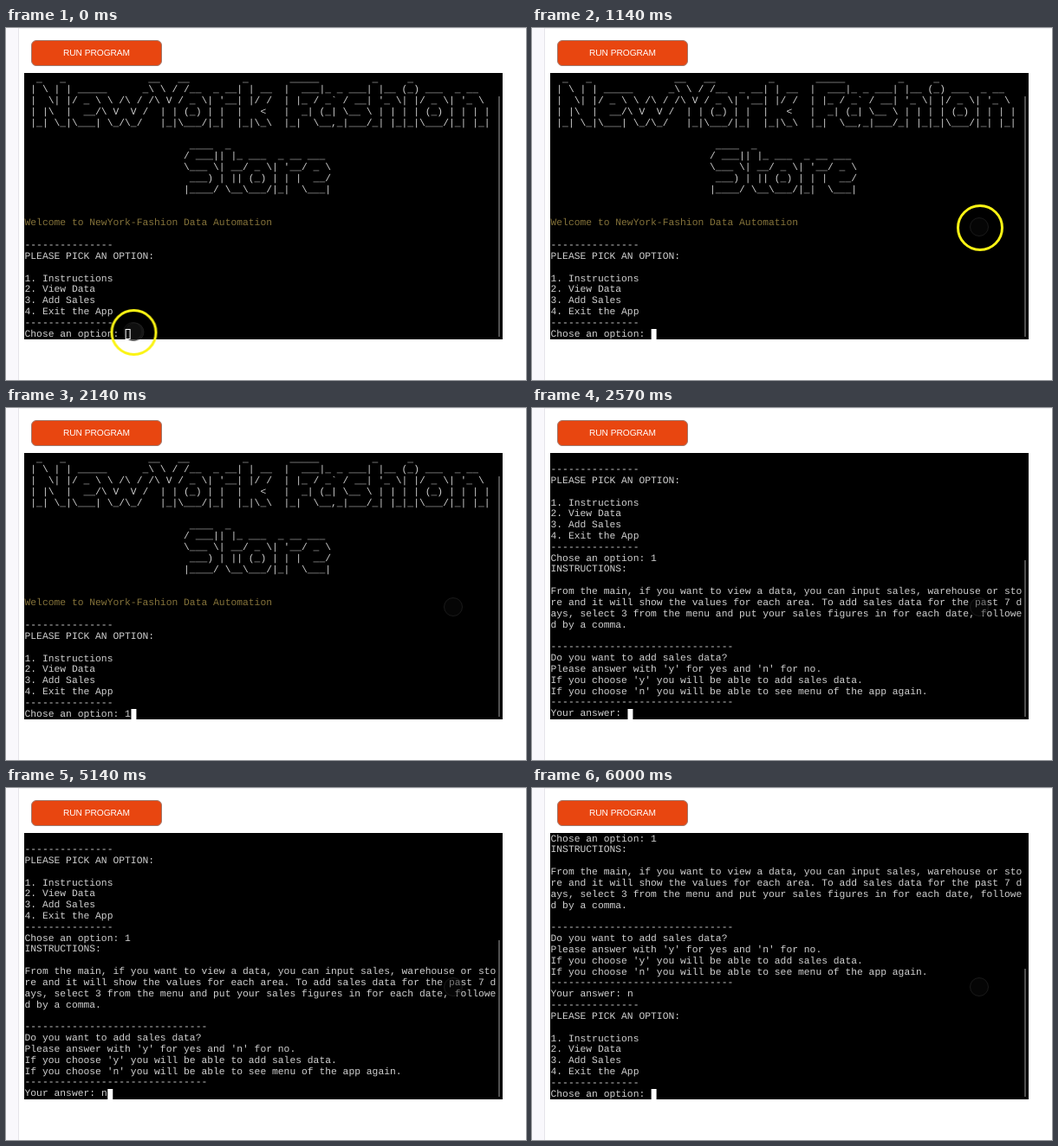
An HTML page for the animation above (8 s loop, 600 by 407 pixels).

```html
<!DOCTYPE html>
<html lang="en">
<head>
<meta charset="utf-8">
<title>Terminal session</title>
<style>
:root { --cw: 6.8px; --lh: 12.833px; }
html, body { margin: 0; width: 100%; height: 100%; overflow: hidden; background: #fff; }
.stage { position: relative; width: 600px; height: 407px; overflow: hidden; }
.stage > * { position: absolute; box-sizing: border-box; }
.side { left: 0; top: 0; width: 15px; height: 407px; background: #f9f8fc; border-right: 1px solid #e5e4e9; }
.edge { left: 15px; top: 0; width: 585px; height: 1px; background: #f0eff3; }
.run {
  left: 29px; top: 14px; width: 151px; height: 30px;
  border: 1px solid #a0776a; border-radius: 6px; background: #e84610; color: #fff;
  font: 10.15px/29px "Liberation Sans", Arial, sans-serif; text-align: center;
  text-rendering: geometricPrecision;
}
.term { left: 21px; top: 52px; width: 552px; height: 308px; background: #000; overflow: hidden; }
pre {
  position: absolute; left: .5px; top: 1.6px; margin: 0; color: #d0d0d0;
  font: 11.333px/var(--lh) "Liberation Mono", "Courier New", monospace;
  font-variant-ligatures: none; text-rendering: geometricPrecision;
}
.gold { color: #85733a; }
.thumb { position: absolute; left: 547px; top: 27px; bottom: 3px; width: 2px; background: #505050; }
.cursor { left: 21.6px; top: 348px; width: 6.8px; height: 12px; border: 1px solid #fff; }
svg { left: 0; top: 0; }

pre, .thumb, .cursor, .one, .no, .menu, .echo, .pointer, .ring { animation: 8s step-end infinite; }
pre { animation-name: scroll; }
.thumb { animation-name: thumb; }
.cursor { animation-name: cursor; }
.one { animation-name: one; }
.no { animation-name: no; }
.menu { animation-name: menu; }
.echo { animation-name: echo; }
.pointer { animation-name: move; }
.ring { animation-name: move, fade; }

@keyframes scroll {
  0% { transform: none; }
  32.125% { transform: translateY(calc(var(--lh) * -14)); }
  73.25% { transform: translateY(calc(var(--lh) * -15)); }
  75%, 100% { transform: translateY(calc(var(--lh) * -23)); }
}
@keyframes thumb {
  0% { top: 27px; }
  32.125% { top: 124px; }
  73.25% { top: 129px; }
  75%, 100% { top: 157px; }
}
@keyframes cursor {
  0% { transform: translateX(calc(var(--cw) * 17)); background: none; }
  7.125% { transform: translateX(calc(var(--cw) * 17)); background: #fff; }
  21.375% { transform: translateX(calc(var(--cw) * 18)); background: #fff; }
  32.125% { transform: translateX(calc(var(--cw) * 13)); background: #fff; }
  64.25% { transform: translateX(calc(var(--cw) * 14)); background: #fff; }
  73.25% { transform: none; background: #fff; }
  75%, 100% { transform: translateX(calc(var(--cw) * 17)); background: #fff; }
}
@keyframes one { 0% { visibility: hidden; } 21.375%, 100% { visibility: visible; } }
@keyframes no { 0% { visibility: hidden; } 64.25%, 100% { visibility: visible; } }
@keyframes menu { 0% { visibility: hidden; } 75%, 100% { visibility: visible; } }
@keyframes move {
  0% { transform: translate(147.5px, 352px); }
  8.875% { transform: translate(248px, 348px); }
  10.75% { transform: translate(413px, 295.5px); }
  12.5% { transform: translate(514px, 232.5px); }
  14.25%, 100% { transform: translate(517px, 231px); }
}
@keyframes fade {
  0% { opacity: 1; stroke-width: 3px; }
  16.125% { opacity: .9; stroke-width: 2.4px; }
  17.875% { opacity: .78; stroke-width: 2.2px; }
  19.625% { opacity: .65; stroke-width: 2.2px; }
  21.375% { opacity: .45; stroke-width: 2px; }
  23.25% { opacity: .25; stroke-width: 2px; }
  25% { opacity: .06; stroke-width: 2px; }
  26.75%, 100% { opacity: 0; stroke-width: 2px; }
}
@keyframes echo {
  0% { opacity: .45; }
  5.375% { opacity: 1; }
  8.875% { opacity: .8; }
  10.75% { opacity: .5; }
  12.5% { opacity: .25; }
  14.25%, 100% { opacity: 0; }
}
</style>
</head>
<body>
<div class="stage">
  <div class="side"></div>
  <div class="edge"></div>
  <div class="run">RUN PROGRAM</div>
  <div class="term">
<pre>
  _   _              __   __         _       _____         _     _
 | \ | | _____      _\ \ / /__  _ __| | __  |  ___|_ _ ___| |__ (_) ___  _ __
 |  \| |/ _ \ \ /\ / /\ V / _ \| '__| |/ /  | |_ / _` / __| '_ \| |/ _ \| '_ \
 | |\  |  __/\ V  V /  | | (_) | |  |   &lt;   |  _| (_| \__ \ | | | | (_) | | | |
 |_| \_|\___| \_/\_/   |_|\___/|_|  |_|\_\  |_|  \__,_|___/_| |_|_|\___/|_| |_|

                            ____  _
                           / ___|| |_ ___  _ __ ___
                           \___ \| __/ _ \| '__/ _ \
                            ___) | || (_) | | |  __/
                           |____/ \__\___/|_|  \___|


<span class="gold">Welcome to NewYork-Fashion Data Automation</span>

---------------
PLEASE PICK AN OPTION:

1. Instructions
2. View Data
3. Add Sales
4. Exit the App
---------------
Chose an option: <span class="one">1</span>
INSTRUCTIONS:

From the main, if you want to view a data, you can input sales, warehouse or sto
re and it will show the values for each area. To add sales data for the past 7 d
ays, select 3 from the menu and put your sales figures in for each date, followe
d by a comma.

-------------------------------
Do you want to add sales data?
Please answer with 'y' for yes and 'n' for no.
If you choose 'y' you will be able to add sales data.
If you choose 'n' you will be able to see menu of the app again.
-------------------------------
Your answer: <span class="no">n</span>
<span class="menu">---------------
PLEASE PICK AN OPTION:

1. Instructions
2. View Data
3. Add Sales
4. Exit the App
---------------
Chose an option: </span></pre>
    <div class="thumb"></div>
  </div>
  <svg width="600" height="407" fill="none">
    <circle class="echo" cx="148.5" cy="351.5" r="10.5" fill="#333" fill-opacity=".85" stroke="#777" stroke-opacity=".5"/>
    <circle class="pointer" cx="-1" cy="-1" r="10.5" fill="#0a0a0a" fill-opacity=".45" stroke="#2a2a2a" stroke-opacity=".6"/>
  </svg>
  <div class="cursor"></div>
  <svg width="600" height="407" fill="none">
    <circle class="ring" r="25.5" stroke="#fbf414"/>
  </svg>
</div>
</body>
</html>
```
